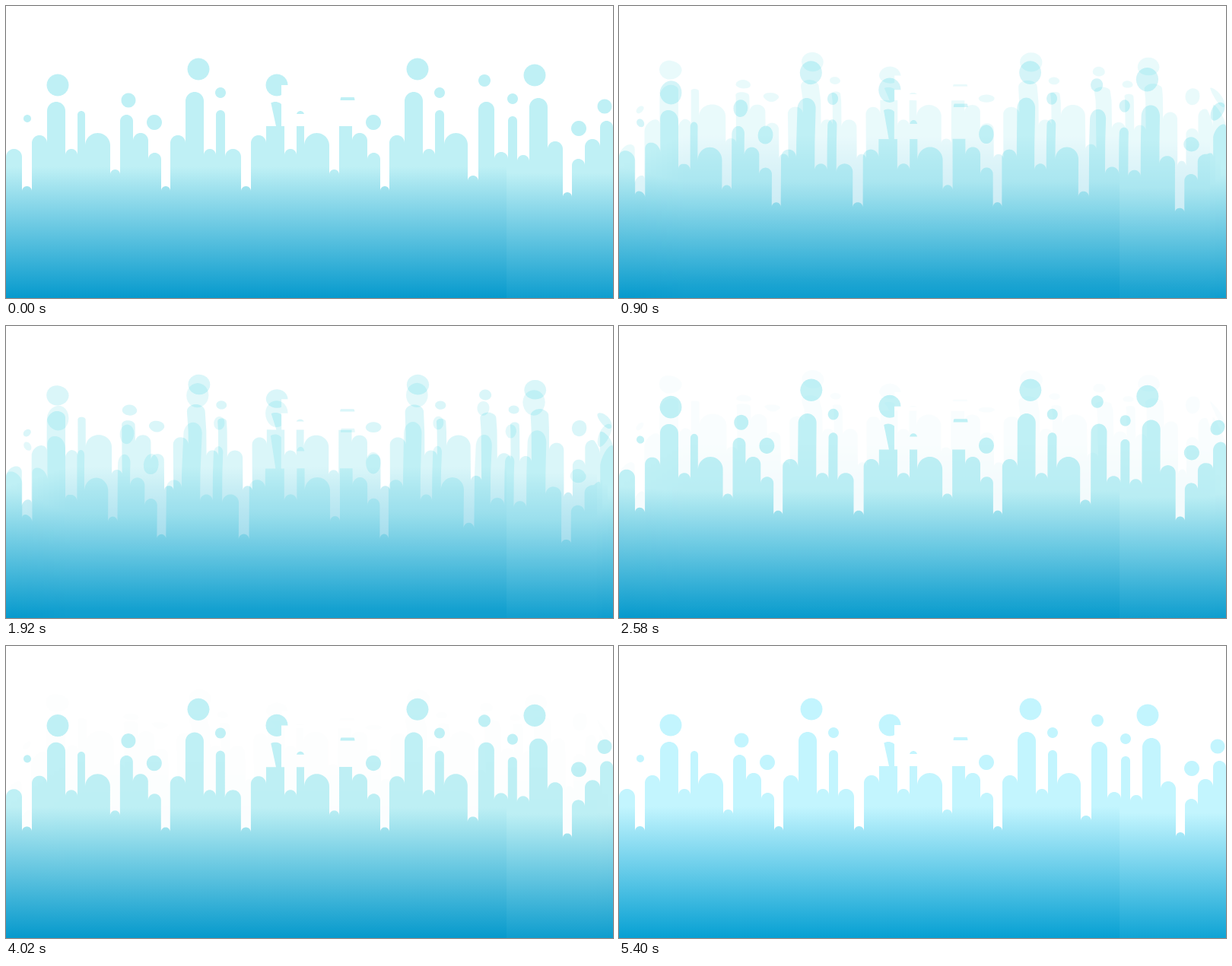
Recreate the animation shown at these times as an HTML page with a canvas. Size 798x384 px, loop 5.46 s.

```html
<!DOCTYPE html>
<html lang="en">
<head>
<meta charset="utf-8">
<title>Rising water</title>
<style>
  html, body { margin: 0; width: 100%; height: 100%; overflow: hidden; background: #fff; }
  canvas { display: block; filter: blur(.6px); }
</style>
</head>
<body>
<canvas id="stage" width="798" height="384"></canvas>
<script>
const W = 798, H = 384, BASE = 470;
const LOOP = 5460, STEP = 60, STEPS_PER_CYCLE = 22.5;
const TILE = 288, SEAM = 658, MIRROR = 948, DROP = 8;
const stage = document.getElementById('stage').getContext('2d');
const overlay = document.createElement('canvas');
overlay.width = W;
overlay.height = H;
const overlayCtx = overlay.getContext('2d');

const clamp = (v, lo, hi) => Math.min(hi, Math.max(lo, v));
const mix = (a, b, k) => a + (b - a) * k;

// One tile of the pattern: columns as width and top, drops as x, y and radius.
const tileColumns = [
  [21, 188], [13, 237], [20, 170], [24, 126], [16, 188], [10, 138], [33, 167], [13, 215],
  [17, 143], [20, 167], [17, 193], [12, 237], [20, 170], [24, 113], [16, 188], [12, 137]
];
const tileDrops = [
  [28, 148, 5], [68, 104, 14.5], [161, 124, 9.5], [195, 153, 10], [253, 83, 14.5], [282, 114, 7]
];

// Two tiles, a bridge, then the tile mirrored and set a little lower.
const columns = [
  ...tileColumns, ...tileColumns,
  [31, 167], [14, 223], [21, 126], [18, 192],
  ...tileColumns.map(([w, top]) => [w, top + DROP]).reverse().slice(0, 8)
];
const drops = [
  ...tileDrops,
  ...tileDrops.map(([x, y, r]) => [x + TILE, y, r]),
  [629, 98, 8],
  ...tileDrops.map(([x, y, r]) => [MIRROR - x, y + DROP, r])
];

// Areas wiped out of the middle of the pattern.
const box = (x, y, w, h) => [[x, y], [x + w, y], [x + w, y + h], [x, y + h]];
const wiped = [
  box(306, 140, 20, 16), box(362, 104, 18, 54), box(380, 142, 82, 16),
  box(436, 112, 26, 8), box(436, 124, 26, 20),
  [[340, 120], [348, 126], [355, 158], [340, 158]]
];

// The flow: rise by height, pinned at both sides, with two stronger plumes.
const riseByHeight = [[60, 10], [97, 17], [126, 30], [160, 55], [240, 64], [384, 28]];
const plumes = [[60, 100, 17], [755, 145, 14]];

function rise(x, y) {
  const level = y + 10 * ((x - 450) / 350) ** 2 - 4;
  const i = clamp(riseByHeight.findIndex(key => key[0] > level), 1, 5);
  const j = level > H ? 5 : i;
  const [y0, r0] = riseByHeight[j - 1], [y1, r1] = riseByHeight[j];
  let total = mix(r0, r1, clamp((level - y0) / (y1 - y0), 0, 1));
  total *= clamp(x / 85, 0, 1) * clamp((W - x) / 25, 0, 1);
  for (const [px, py, size] of plumes) {
    total += size * Math.exp(-((x - px) ** 2 + (y - py) ** 2) / 600);
  }
  return total;
}

function warp([x, y], amount) {
  const up = rise(x, y);
  const sway = 4 + 6 * Math.cos((x - 225) / 400 * 2 * Math.PI);
  return [x + amount * sway * up / 64, y - amount * up];
}

function line([x0, y0], [x1, y1]) {
  const n = Math.ceil(Math.hypot(x1 - x0, y1 - y0) / 6) || 1;
  return Array.from({ length: n + 1 }, (_, i) => [mix(x0, x1, i / n), mix(y0, y1, i / n)]);
}

function arc(cx, cy, r, from, to) {
  const n = 24;
  return Array.from({ length: n + 1 }, (_, i) => {
    const a = mix(from, to, i / n);
    return [cx + r * Math.cos(a), cy + r * Math.sin(a)];
  });
}

function buildSkyline() {
  const points = [];
  let x = 0, y = BASE;
  for (const [width, top] of columns) {
    const r = width / 2, shoulder = top + r;
    points.push(...line([x, y], [x, shoulder]), ...arc(x + r, shoulder, r, Math.PI, 2 * Math.PI));
    x += width;
    y = shoulder;
  }
  return [...points, ...line([x, y], [x, BASE])];
}

const skyline = buildSkyline();
const circles = drops.map(([x, y, r]) => arc(x, y, r, 0, 2 * Math.PI));
const gaps = wiped.map(shape => shape.flatMap((p, i) => line(p, shape[(i + 1) % shape.length])));

function outline(points, amount) {
  const path = new Path2D();
  for (const point of points) path.lineTo(...warp(point, amount));
  path.closePath();
  return path;
}

function drawLayer(ctx, amount, [light, deep]) {
  const rgb = k => `rgb(${light.map((c, i) => mix(c, deep[i], k))})`;
  const fill = (shapes, color) => {
    ctx.fillStyle = color;
    for (const points of shapes) ctx.fill(outline(points, amount));
  };
  ctx.fillStyle = '#fff';
  ctx.fillRect(0, 0, W, H);
  fill(circles, rgb(0));

  ctx.save();
  ctx.clip(outline(skyline, amount));
  const stripe = 7;
  for (let x = 0; x < W; x += stripe) {
    const shift = x < SEAM ? 0 : DROP;
    const [top, bend, end] = [211 + shift, 240, H + shift];
    const [y0, y1, y2] = [top, bend, end].map(y => warp([x + stripe / 2, y], amount)[1]);
    const shade = ctx.createLinearGradient(0, y0, 0, y2);
    shade.addColorStop(0, rgb(0));
    shade.addColorStop((y1 - y0) / (y2 - y0), rgb((bend - top) / (end - top)));
    shade.addColorStop(1, rgb(1));
    ctx.fillStyle = shade;
    ctx.fillRect(x, 0, stripe, H);
  }
  ctx.restore();
  fill(gaps, '#fff');
}

const softWater = [[191, 240, 245], [6, 154, 205]];
const brightWater = [[195, 245, 254], [6, 160, 211]];

// The rising picture fades out while its copy rises into the resting place.
function draw(now) {
  const step = Math.floor(now % LOOP / STEP);
  const phase = step / STEPS_PER_CYCLE % 1;
  const water = step < 3 * STEPS_PER_CYCLE ? softWater : brightWater;
  drawLayer(stage, phase, water);
  if (phase > 0) {
    drawLayer(overlayCtx, phase - 1, water);
    stage.globalAlpha = phase;
    stage.drawImage(overlay, 0, 0);
    stage.globalAlpha = 1;
  }
}

const begin = performance.now();
function tick() {
  draw(performance.now() - begin);
  requestAnimationFrame(tick);
}
tick();
</script>
</body>
</html>
```
